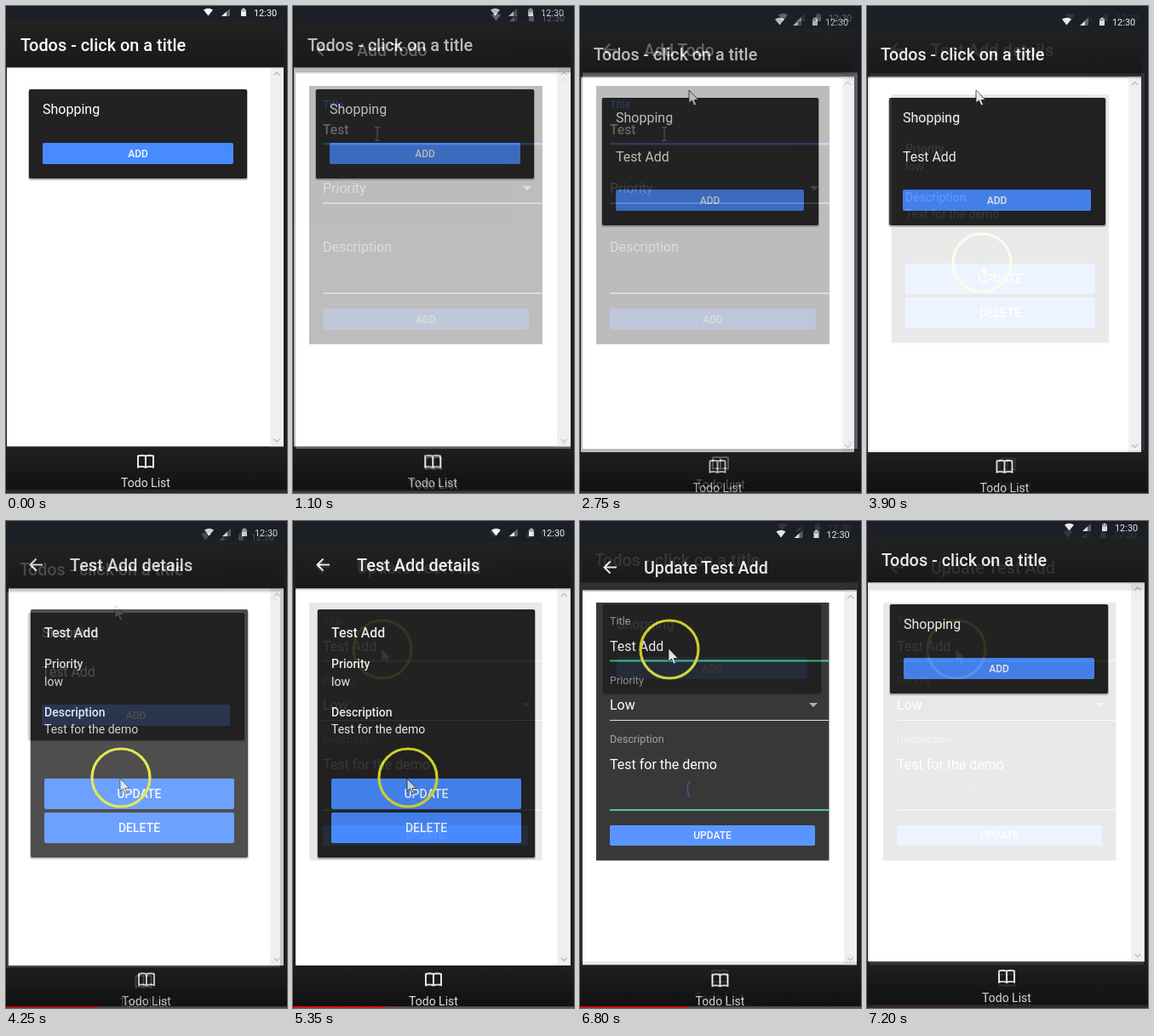
Animation of 330 by 573 pixels, one loop 7.25 s. Source, as an HTML page:

```html
<!DOCTYPE html>
<html lang="en">
<head>
<meta charset="utf-8">
<title>Todo app</title>
<style>
html, body { margin: 0; width: 100%; height: 100%; overflow: hidden; background: #1a1a1a; }
svg { position: absolute; left: 0; top: 0; width: 330px; height: 573px; font-family: Roboto, sans-serif; }
</style>
</head>
<body>
<script>
const LOOP = 7250, BLUE = '#488aff', CARD = '#222', GREEN = '#3fc380';

const rect = (x, y, w, h, fill, r = 0, more = '') =>
  `<rect x="${x}" y="${y}" width="${w}" height="${h}" rx="${r}" fill="${fill}" ${more}/>`;
const text = (x, y, size, str, fill = '#fff', weight = 400, anchor = 'start') =>
  `<text x="${x}" y="${y}" font-size="${size}" font-weight="${weight}" fill="${fill}" text-anchor="${anchor}">${str}</text>`;
const line = (d, color, width = 1) =>
  `<path d="${d}" fill="none" stroke="${color}" stroke-width="${width}"/>`;
const fill = (d, color) => `<path d="${d}" fill="${color}"/>`;
const at = (x, y, body) => `<g transform="translate(${x} ${y})">${body}</g>`;

const card = (x, y, w, h, r = 2) =>
  rect(x - 1, y, w + 2, h + 2, '#000', r + 1, 'opacity=".25"') + rect(x, y, w, h, CARD, r);
const button = (x, y, w, h, label, size = 12, bg = BLUE, color = '#f4f7ff') =>
  rect(x, y, w, h, bg, 2) + text(x + w / 2, y + h / 2 + size * .36, size, label, color, 500, 'middle');
const caret = (x, y, color) => fill(`M${x} ${y}h10l-5 5z`, color);
const ring = (x, y) => `<circle cx="${x}" cy="${y}" r="34" fill="none" stroke="#dfe02a" stroke-width="3.2"/>`;
const pointer = (x, y, color = '#fff') => at(x, y,
  `<path d="M0 0V15L3.5 12 6 18 8.5 17 6 11.5H11Z" fill="${color}" stroke="#222" stroke-width=".8"/>`);
const back = y => line(`M43 ${y}H28.5M35.5 ${y - 7}l-7 7 7 7`, '#fff', 2);

const status = (x, y) => at(x, y,
  fill('M-59 -7.5Q-53.5 -11 -48 -7.5L-53.5 -.5Z', '#fff') +
  fill('M-28 -9V0H-38Z', '#666') + fill('M-32 -5.4V0H-38Z', '#eee') +
  fill('M-15 -8h1.5v-1.3h3V-8H-9V0h-6z', '#eee') + rect(-15, -8, 6, 2.5, '#aaa') +
  text(0, 0, 10.9, '12:30'));

const book = (x, y) => at(x, y,
  line('M0 -7Q-4.5 -8.6 -9 -7V6Q-4.5 4.6 0 6.4Q4.5 4.6 9 6V-7Q4.5 -8.6 0 -7V6.4', '#f2f2f2', 1.9));

// Phone shell: p gives the edges and anchors of one screen.
const shell = p => {
  const { left, top, bottom, bar, right, mid } = p, sx = (bar + right) / 2;
  return rect(0, 0, 330, 573, '#1b2027') +
    rect(left, p.head, right - left, top - p.head, 'url(#head)') +
    rect(left, top, right - left, bottom - top, '#fff') +
    rect(bar, top, right - bar, bottom - top, '#f0f0f0') +
    rect(left, top, right - left, 1.2, '#aaa') +
    line(`M${sx - 3.5} ${top + 9.5}l3.5 -3.5 3.5 3.5M${sx - 3.5} ${bottom - 9}l3.5 3.5 3.5 -3.5`, '#b4b4b4', 1.2) +
    rect(0, bottom, 330, 573 - bottom, 'url(#foot)') +
    status(p.time, p.timeY) +
    text(p.titleX, p.titleY, p.size, p.title, '#fff', 500) +
    book(mid, p.icon) + text(mid, p.label, 14, 'Todo List', '#e2e2e2', 400, 'middle');
};
const progress = (w, rest) => rect(0, 571, 330, 2, rest) + rect(0, 571, w, 2, '#d51414');

const home = shell({ left: 1, top: 72, bottom: 518.5, bar: 310, right: 326, mid: 164, head: 17, time: 291, timeY: 12,
    titleX: 17, titleY: 53, size: 19.9, title: 'Todos - click on a title', icon: 536.5, label: 566 }) +
  card(27, 98, 256, 105) + text(43, 127, 16, 'Shopping') + button(43, 161, 224, 25, 'ADD') +
  rect(0, 569, 330, 4, '#2a2a2a');

const add = shell({ left: 3, top: 78.5, bottom: 521, bar: 310, right: 326, mid: 165, head: 24, time: 292, timeY: 18,
    titleX: 75, titleY: 59, size: 19.6, title: 'Add Todo', icon: 538.5, label: 568 }) + back(51.5) +
  rect(19, 94, 274, 304, CARD) +
  text(35, 120, 12.3, 'Title', '#3b78e0', 500) + text(35, 151, 15.6, 'Test', '#fff', 500) +
  rect(35, 161, 258, 2.5, '#3f7de6') +
  line('M96 142.5h2l1 1 1 -1h2M99 143.5v14M96 158.5h2l1 -1 1 1h2', '#bbb', 1.2) +
  text(35, 220, 16, 'Priority', '#8d8d8d') + caret(270, 212, '#999') + rect(35, 231.5, 258, 1, '#ddd') +
  text(35, 288.5, 16, 'Description', '#8d8d8d') + rect(35, 337.5, 258, 1, '#ddd') +
  button(35, 356, 242, 25, 'ADD', 12, '#254681', '#848c9a') + progress(0, '#777');

const list = shell({ left: 1, top: 83.5, bottom: 525, bar: 307, right: 322, mid: 161.5, head: 28, time: 288, timeY: 23,
    titleX: 16, titleY: 64, size: 19.7, title: 'Todos - click on a title', icon: 542.5, label: 572 }) +
  card(26, 108, 254, 150) + text(42, 137, 16, 'Shopping') + text(42, 182.5, 15.9, 'Test Add') +
  button(42, 216, 221, 25, 'ADD') + pointer(128, 99);

const details = shell({ left: 3, top: 79, bottom: 523, bar: 310.5, right: 326, mid: 165, head: 24, time: 292, timeY: 18,
    titleX: 75, titleY: 59, size: 19.9, title: 'Test Add details', icon: 540, label: 570 }) + back(51.5) +
  card(29, 104, 255, 292) + text(45, 136.5, 15.8, 'Test Add', '#fff', 500) +
  text(45, 173, 14, 'Priority', '#fff', 500) + text(45, 193.5, 14, 'low') +
  text(45, 229.5, 14, 'Description', '#fff', 500) + text(45, 250, 14, 'Test for the demo') +
  button(45, 303, 223, 36, 'UPDATE', 14) + button(45, 343, 223, 36, 'DELETE', 14) +
  ring(135, 302) + pointer(134, 303, '#cfe6f5') + progress(108, '#555');

const update = shell({ left: 3, top: 81.5, bottom: 522.5, bar: 310, right: 325, mid: 164.5, head: 26, time: 289.5, timeY: 20,
    titleX: 75, titleY: 62, size: 19.7, title: 'Update Test Add', icon: 541, label: 570 }) + back(54.5) +
  rect(19, 96, 273.5, 303.5, CARD) +
  text(35, 122, 12.6, 'Title', '#999') + text(35, 153, 16, 'Test Add') + rect(35, 163.5, 257, 2, GREEN) +
  text(35, 191.5, 12.6, 'Priority', '#999') + text(35, 222, 16, 'Low') + caret(269, 214, '#aaa') +
  rect(35, 234, 257, 1, '#ddd') +
  text(35, 261, 12.6, 'Description', '#999') + text(35, 291.5, 16, 'Test for the demo') +
  line('M129 306Q123 315 129 325', '#2a4590', 1.5) + rect(35, 339, 257, 2, GREEN) +
  button(35, 358, 241, 24, 'UPDATE') + ring(105, 151) + pointer(104, 150) + progress(126, '#555');

const defs = `<defs>
  <linearGradient id="head" x2="0" y2="1"><stop stop-color="#222"/><stop offset="1" stop-color="#191919"/></linearGradient>
  <linearGradient id="foot" x2="0" y2="1"><stop stop-color="#202020"/><stop offset="1" stop-color="#111"/></linearGradient>
</defs>`;

// Each screen fades in over the one below in ten hard steps; the last one fades away to the first.
const scenes = [[home], [add, 1000, 2950], [list, 2450, 4400], [details, 3900, 5850], [update, 5350, 6800]];
document.body.innerHTML = scenes.map(([body]) => `<svg viewBox="0 0 330 573">${defs}${body}</svg>`).join('');

const key = (ms, opacity, easing = 'linear') => ({ offset: Math.min(1, (ms - 1) / LOOP), opacity, easing });
document.querySelectorAll('svg').forEach((el, i) => {
  const [, start, end] = scenes[i];
  if (!start) return;
  const last = i === scenes.length - 1;
  const tail = last
    ? [key(end, 1, 'steps(9, start)'), key(LOOP + 1, .1)]
    : [key(end, 1), key(end, 0), key(LOOP + 1, 0)];
  el.animate([key(1, 0), key(start, 0, 'steps(10, start)'), key(start + 500, 1), ...tail],
    { duration: LOOP, iterations: Infinity });
});
</script>
</body>
</html>
```
